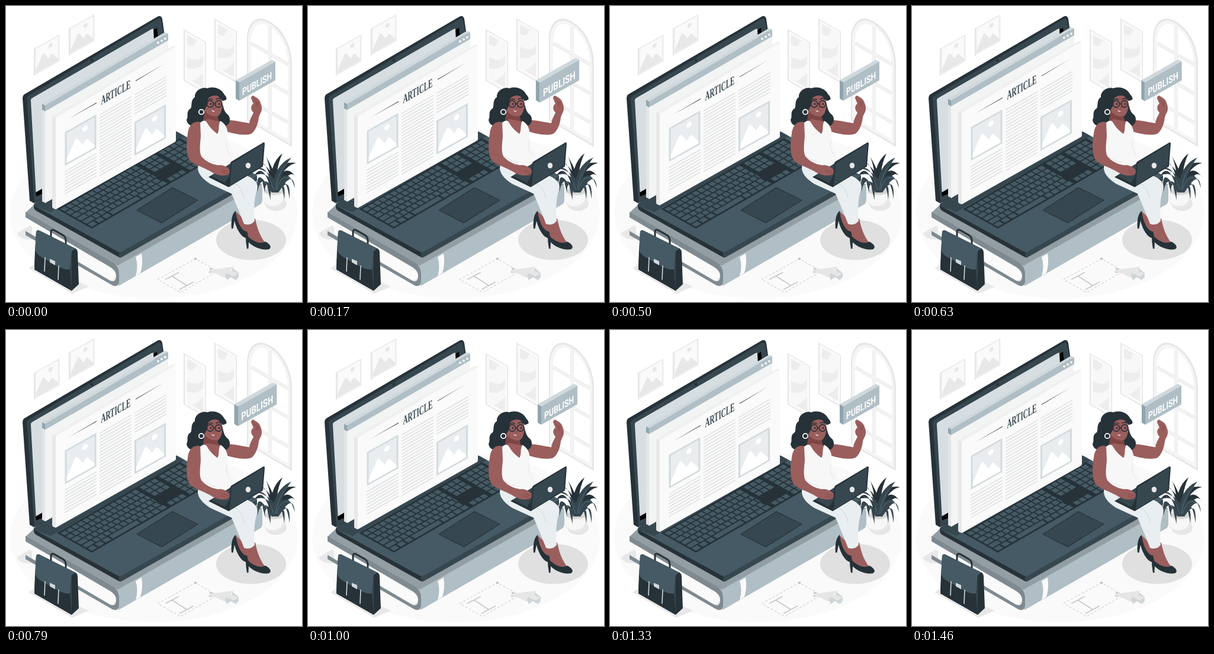
Recreate the animation shown at these times as an HTML page with a canvas. Size 500 px wide and 500 px high, loop 1500 ms.

```html
<!DOCTYPE html>
<html lang="en">
<head>
<meta charset="utf-8">
<title>Publishing an article</title>
<style>
html, body { margin: 0; width: 100%; height: 100%; overflow: hidden; background: #fff; }
canvas { display: block; }
</style>
</head>
<body>
<canvas id="stage" width="500" height="500"></canvas>
<script>
const ctx = document.getElementById('stage').getContext('2d');
const LOOP = 1500;
const SLOPE = 0.577;
const INK = '#263238', SLATE = '#37474f', STEEL = '#455a64', MIST = '#b0bec5';
const SKIN = '#9a5e5d', SKIN_SHADE = '#7d4645';

function fill(color, d) {
  ctx.fillStyle = color;
  ctx.fill(new Path2D(d));
}

function line(color, width, d) {
  ctx.strokeStyle = color;
  ctx.lineWidth = width;
  ctx.stroke(new Path2D(d));
}

function oval(color, x, y, rx, ry = rx) {
  ctx.fillStyle = color;
  ctx.beginPath();
  ctx.ellipse(x, y, rx, ry, 0, 0, Math.PI * 2);
  ctx.fill();
}

function ring(color, width, x, y, r) {
  ctx.strokeStyle = color;
  ctx.lineWidth = width;
  ctx.beginPath();
  ctx.arc(x, y, r, 0, Math.PI * 2);
  ctx.stroke();
}

function rect(color, x, y, w, h) {
  ctx.fillStyle = color;
  ctx.fillRect(x, y, w, h);
}

function plane(matrix, draw) {
  ctx.save();
  ctx.transform(...matrix);
  draw();
  ctx.restore();
}

// Vertical wall: a positive slope runs down to the right.
function wall(x, y, slope, draw, scaleX = 1, scaleY = 1) {
  plane([scaleX, slope * scaleX, 0, scaleY, x, y], draw);
}

function label(text, x, y, font, color, condense) {
  wall(x, y, -SLOPE, () => {
    ctx.font = font;
    ctx.fillStyle = color;
    ctx.fillText(text, 0, 0);
  }, condense);
}

function picture(x, y, scale, frame, sky, hills) {
  wall(x, y, -0.56, () => {
    rect(frame, 0, 0, 53, 57);
    rect(sky, 3, 3, 47, 51);
    fill(hills, 'M3 47L17 23Q19 20 21 23L30 38L35 33Q37 31 39 34L50 50V54H3Z');
    oval(hills, 34, 13, 4.5);
  }, scale, scale);
}

function poster(x, y) {
  wall(x, y, SLOPE, () => {
    rect('#e6e6e6', 0, 0, 38, 87);
    rect('#fafafa', 2, 1.5, 34.5, 83.5);
    rect('#ededed', 6, 6, 27, 74);
    fill('#f8f8f8', 'M6 22Q18 24 20 10L24 6H33V24Q28 42 6 44Z');
    fill('#f8f8f8', 'M6 62Q22 58 33 40V54Q25 70 14 80H6Z');
  });
}

function archWindow() {
  fill('#e6e6e6', 'M407 193V54C408 28 423 15 441 24C466 35 483 66 483 98V238Z');
  fill('#f5f5f5', 'M409 192V55C410 31 424 19 441 27C464 38 480 68 480 98V233Z');
  fill('#fff', 'M414 189V57C415 36 426 26 441 32C462 42 476 70 476 97V225Z');
  const bars = 'M446 34V208M414 63L477 99M414 112L477 148M414 161L477 197';
  line('#e6e6e6', 5, bars);
  line('#f5f5f5', 3, bars);
}

function room() {
  oval('#fafafa', 250, 350, 243, 144);
  [[47, 72], [106, 38]].forEach(([x, y]) => {
    fill('#e0e0e0', `M${x} ${y}l2 -1v46l-2 1Z`);
    picture(x + 1, y - 0.5, 0.8, '#ececec', '#fafafa', '#e8e8e8');
  });
  poster(300, 39);
  poster(352, 21);
  archWindow();
  oval('#e0e0e0', 414, 395, 59, 34);
  oval('#e6e6e6', 456, 334, 18, 12);
  fill('#e8e8e8', 'M18 384L40 371L190 462L178 470L46 394Q24 396 18 384ZM38 443L52 434L140 474L112 486Z');
}

function book() {
  fill('#939ea4', 'M33 349L47 336L285 212L433 302L190 440Z');
  fill(MIST, 'M186 440L424 305Q433 300 433 308V328Q433 333 428 336L190 473Z');
  fill('#fafafa', 'M44 362L174 440Q184 446 184 456Q183 466 174 462L44 388Z');
  fill('#7f8a90', 'M33 348L180 433Q191 439 191 453V465Q190 476 180 472L33 387V380L176 464Q186 468 186 456Q186 447 176 441L33 357Z');
  fill('#fafafa', 'M219 424Q224 440 219 456L227 451Q232 436 229 418Z');
}

function keyboard() {
  plane([203 / 22, -117 / 22, 55 / 6, 31 / 6, 90, 343], () => {
    rect(INK, -0.2, -0.2, 22.5, 6.4);
    const key = (x, y, w = 1) => rect(STEEL, x + 0.1, y + 0.1, w - 0.2, 0.8);
    for (let row = 0; row < 6; row++) {
      if (row < 5) {
        const edge = row ? 0.8 + row * 0.25 : 1;
        key(0, row, edge);
        for (let x = edge; x < 13; x++) key(x, row, Math.min(1, 14 - x));
        key(edge + Math.ceil(13 - edge), row, 14 - edge - Math.ceil(13 - edge));
      } else {
        [0, 1.3, 2.6, 9.2, 10.4, 11.6, 12.8].forEach(x => key(x, row, 1.2));
        key(3.9, row, 5.2);
      }
      for (let i = 0; i < 3; i++) {
        if (row < 3 || row === 5) key(14.5 + i, row);
      }
      for (let i = 0; i < 4; i++) key(18 + i, row);
    }
  });
}

function laptop() {
  fill(INK, 'M28 156Q28 150 33 148L255 18.5Q262 14.5 264 22L268 50V235L47 333L40 329Z');
  fill(SLATE, 'M35 157Q35 153 39 151L256 22Q261 19 262 25L267 52V235L48 331Z');
  fill('#d7dee2', 'M42 161Q41 157 45 155L246 39Q250 37 250 42L262 215L51 322Z');
  fill('#000', 'M249 40L255 37L257 53L250 57ZM50 315L62 308V317L51 322Z');
  oval(INK, 145, 92, 2.4);
  fill(INK, 'M47 335L192 414V425L51 346Q46 343 47 335Z');
  fill(SLATE, 'M191 414L424 286V295L196 424Q193 426 191 424Z');
  fill(STEEL, 'M49 338Q45 335 50 332L279 213Q285 210 290 213L424 286L197 414Q192 417 187 414Z');
  fill(SLATE, 'M49 338Q45 335 50 332L279 213Q285 210 290 213L302 220L75 348Z');
  keyboard();
  fill(INK, 'M220 345L281 306L325 328L263 367Z');
  fill(SLATE, 'M222 345L281 307.5L323 328L263 365.5Z');
}

function browserPanel() {
  fill('#e3e5e6', 'M61 174L67 177V333L61 330Z');
  fill('#f3f4f4', 'M66 177L274 57V213L66 333Z');
  fill('#90a4ae', 'M61 165L66 168V178L61 175Z');
  fill('#cfd8dc', 'M61 165L268 44.5L274 46L66 168Z');
  fill(MIST, 'M66 168L272 47Q274 46 274 48V58L66 178Z');
  [0, 1, 2].forEach(i => oval('#fff', 257 + i * 6, 62 - i * 3.4, 1.9));
}

function textLines(x, y, count) {
  for (let i = 0; i < count; i++) {
    line('#d9dcdd', 1.3, `M${x} ${y + i * 5.4}l54 -31`);
  }
}

function page() {
  fill('#e8e8e8', 'M78 186L84 189V343.5L80 342Q78 341 78 339Z');
  fill('#f0f0f0', 'M78 186L281 68Q285 66 287 69L84 189Z');
  fill('#fafafa', 'M84 189L284 70Q287 68 287 72V227Q287 229 285 230L84 343.5Z');
  label('ARTICLE', 160.5, 167, 'bold 21px "Liberation Serif", serif', SLATE, 0.525);
  fill(SLATE, 'M105 191L153 163V164.2ZM267 98L219 125.8V127Z');
  picture(99.5, 213, 1, '#d3dbdf', '#e9edef', '#fff');
  picture(217, 196, 1, '#d3dbdf', '#e9edef', '#fff');
  textLines(99, 280, 8);
  textLines(158, 184, 20);
  textLines(217, 150, 7);
}

function sign() {
  fill('#cfd8dc', 'M388 125.5L449 91L455 94L394 129Z');
  fill('#90a4ae', 'M388 125.5L394 129V160L388 156.5Z');
  fill(MIST, 'M394 129L455 94V125.5L394 160Z');
  label('PUBLISH', 399, 151.5, 'bold 17px Roboto, sans-serif', '#fff', 0.72);
}

function head() {
  fill(INK, 'M340 139C330 136 318 144 319 154C311 159 315 168 312 173C303 178 309 187 305 192C306 204 321 206 331 200L341 196L368 203C379 203 381 188 374 183C367 177 368 170 364 160C374 161 374 154 369 150C364 140 352 135 340 139Z');
  fill(SKIN_SHADE, 'M336 174L357 184L361 200L355 217L332 198Z');
  fill(SKIN, 'M330 197L340 191L362 195L369 202L357 218Z');
  fill(SKIN, 'M337 154C342 147 360 147 364.5 156C367 168 365 181 358 186C350 188 340 184 335 176Z');
  fill(INK, 'M331 162C334 146 345 141 358 145C366 147 370 152 373 157C368 161 362 157 358 152C352 150 344 152 341 157C341 166 338 172 335 176Z');
  ctx.lineCap = 'round';
  line(INK, 1.5, 'M341 158.5Q345 156 349 158M355 157.5Q359 155 363 157.5');
  line(SKIN_SHADE, 1, 'M353 167L354 172L351 173');
  [[345, 165.5], [359, 165.5]].forEach(([x, y]) => {
    ring(INK, 1.6, x, y, 5.6);
    oval(INK, x + 1, y, 1.4, 1.8);
  });
  line(INK, 1.4, 'M350.5 165H353.5M335 166L339.5 165.5');
  fill('#fff', 'M346.5 175.5Q350 178 353 177.5Q350 180.5 346.5 175.5Z');
  ring('#fff', 1.8, 330, 179, 4.2);
}

function legs() {
  fill(SKIN, 'M388 347L402 360L411 380L405 388L392 374Z');
  fill(INK, 'M388 346C381 351 380 365 381 376H383.5L386 363C390 379 398 390 405 392C412 391 412 385 409 381C401 382 391 371 388 346Z');
  fill(SKIN, 'M404 364L421 359C424 375 429 388 437 399L424 403L409 390Z');
  fill(INK, 'M406 386C404 393 406 402 407 410H409.5L410 399C417 407 432 413 444 411C450 408 446 402 438 398C429 403 416 398 406 386Z');
  fill('#e9eef0', 'M328 262C318 276 328 290 346 301L381 317C388 333 396 352 402 368Q413 372 420 363C418 340 420 322 424 310C428 298 416 289 400 284L360 260Z');
  line('#cfd8dc', 1, 'M350 288L391 303Q398 308 402 325');
}

function woman() {
  legs();
  fill(SKIN, 'M361 193C376 191 394 195 411 198C412 191 416 185 418 180C412 174 414 167 418 165L414 156C414 152 417 150 420 153C424 155 429 158 430 164C432 168 433 174 431 179C429 182 428 185 427 188C426 199 421 212 414 216C400 220 383 215 372 212Z');
  line(SKIN_SHADE, 0.8, 'M419 159L424 163L422 169M426 162L425 170');
  head();
  fill('#f7f7f7', 'M328 197Q335 191 339 196C344 205 350 211 357 216C361 211 358 201 362 194C371 199 376 208 374 222C373 235 384 245 387 257L371 276C352 277 333 271 324 264C330 240 325 214 328 197Z');
  line('#e0e0e0', 0.8, 'M374 226Q368 239 379 252M330 252Q340 262 354 264');
  fill(INK, 'M342 289L381 265L402 254L433 271L376 306Z');
  fill(SLATE, 'M347 287L380 267L386 272L370 299Z');
  fill(SKIN, 'M328 196C316 193 308 202 307 216C304 232 304 250 310 260C316 268 334 272 348 281Q360 288 370 286C376 287 380 281 377 276C372 270 364 268 358 269C346 267 337 262 330 254C326 246 328 232 329 220Z');
  line(SKIN_SHADE, 0.8, 'M364 280L375 284M365 277L377 280');
  fill(INK, 'M379 265Q380 263 382 262L434 231Q437 229 437 233L434 271L376 306Z');
  fill(SLATE, 'M381 266L433 233.5Q435 232 435 235L432 270L378 304Z');
  oval('#e6e6e6', 409, 269.5, 4.2, 4.8);
}

// Each leaf bends from the pot towards its tip.
function leaf(color, tipX, tipY, bendX, bendY) {
  fill(color, `M449 315Q${bendX - 5} ${bendY - 6} ${tipX} ${tipY}Q${bendX + 5} ${bendY + 7} 460 315Z`);
}

function plant() {
  fill('#e8e8e8', 'M434 313C432 332 438 341 453 341C468 341 474 331 472 313Z');
  fill('#f7f7f7', 'M434 313C432 330 438 338 450 338C464 338 470 329 470 313Z');
  oval('#f0f0f0', 453, 313, 19, 8);
  oval('#d5d5d5', 453, 313, 16, 6);
  [
    [467, 249, 447, 274], [439, 254, 453, 278], [428, 262, 452, 274],
    [490, 265, 456, 266], [491, 291, 474, 262], [420, 286, 440, 268]
  ].forEach(points => leaf(INK, ...points));
  [
    [482, 256, 457, 274], [421, 274, 450, 272], [488, 308, 480, 267],
    [425, 314, 425, 270], [438, 316, 430, 280], [479, 326, 476, 276],
    [470, 326, 468, 282], [447, 328, 440, 288]
  ].forEach(points => leaf(SLATE, ...points));
  line('#607d8b', 0.7, 'M455 310Q459 280 477 264M452 310Q445 284 428 281M457 310Q466 280 484 294');
}

function briefcase() {
  ctx.lineJoin = 'round';
  line(INK, 3, 'M76 391V382Q76 376 82 379L96 387Q101 390 101 396V404');
  fill(INK, 'M51 381Q53 377 58 380L118 410Q121 412 121 417L123 470L111 481L48 445Z');
  fill(SLATE, 'M51 382Q52 378 57 380L108 410Q111 412 111 417V481L48 445Z');
  fill(STEEL, 'M51 382Q52 378 57 380L118 410Q110 412 110 420L108 445Q98 447 81 436L61 425Q50 419 49 411Z');
  fill(INK, 'M49 411Q50 419 61 425L81 436Q98 447 108 445L111 481L48 445Z');
  line('#cfd8dc', 1.6, 'M66 425L65 448M89 439L88 462');
  fill('#cfd8dc', 'M74 427L83 431V438L74 433Z');
}

function floorMarks() {
  ctx.lineCap = 'butt';
  ctx.setLineDash([4, 3]);
  line('#c7c7c7', 1, 'M256 462L320 427L357 448L295 484Z');
  ctx.setLineDash([]);
  line('#c7c7c7', 1.5, 'M269 462L292 450M293 479L317 466M280 456L305 472');
  oval('#bdbdbd', 320, 427, 2.4, 1.7);
  oval('#bdbdbd', 346, 444, 2, 1.5);
  fill('#cfd5d8', 'M343 447L371 458L373 463L380 458L388 463L393 458V451L382 442V447L343 451Z');
  fill('#e6e6e6', 'M343 446L386 440L379 446L393 452L384 457L372 451L369 459Z');
}

// Two beats, then a rest.
function beat(p) {
  const rise = (from, peak, to) =>
    Math.max(0, Math.min((p - from) / (peak - from), (to - p) / (to - peak)));
  return 1 + 0.1 * (rise(0, 0.1, 0.3) + rise(0.4, 0.5, 0.6));
}

function draw(now) {
  const p = (now % LOOP) / LOOP;
  rect('#fff', 0, 0, 500, 500);
  room();
  book();
  laptop();

  const lift = 10 * (1 - Math.abs(1 - 2 * p));
  plane([1, 0, 0, 1, 0, -lift], () => {
    browserPanel();
    page();
  });

  const s = beat(p), cx = 421.5, cy = 126;
  plane([s, 0, 0, s, cx * (1 - s), cy * (1 - s)], sign);

  plant();
  woman();
  briefcase();
  floorMarks();
}

let start;
function frame(now) {
  start ??= now;
  draw(now - start);
  requestAnimationFrame(frame);
}
requestAnimationFrame(frame);
</script>
</body>
</html>
```
